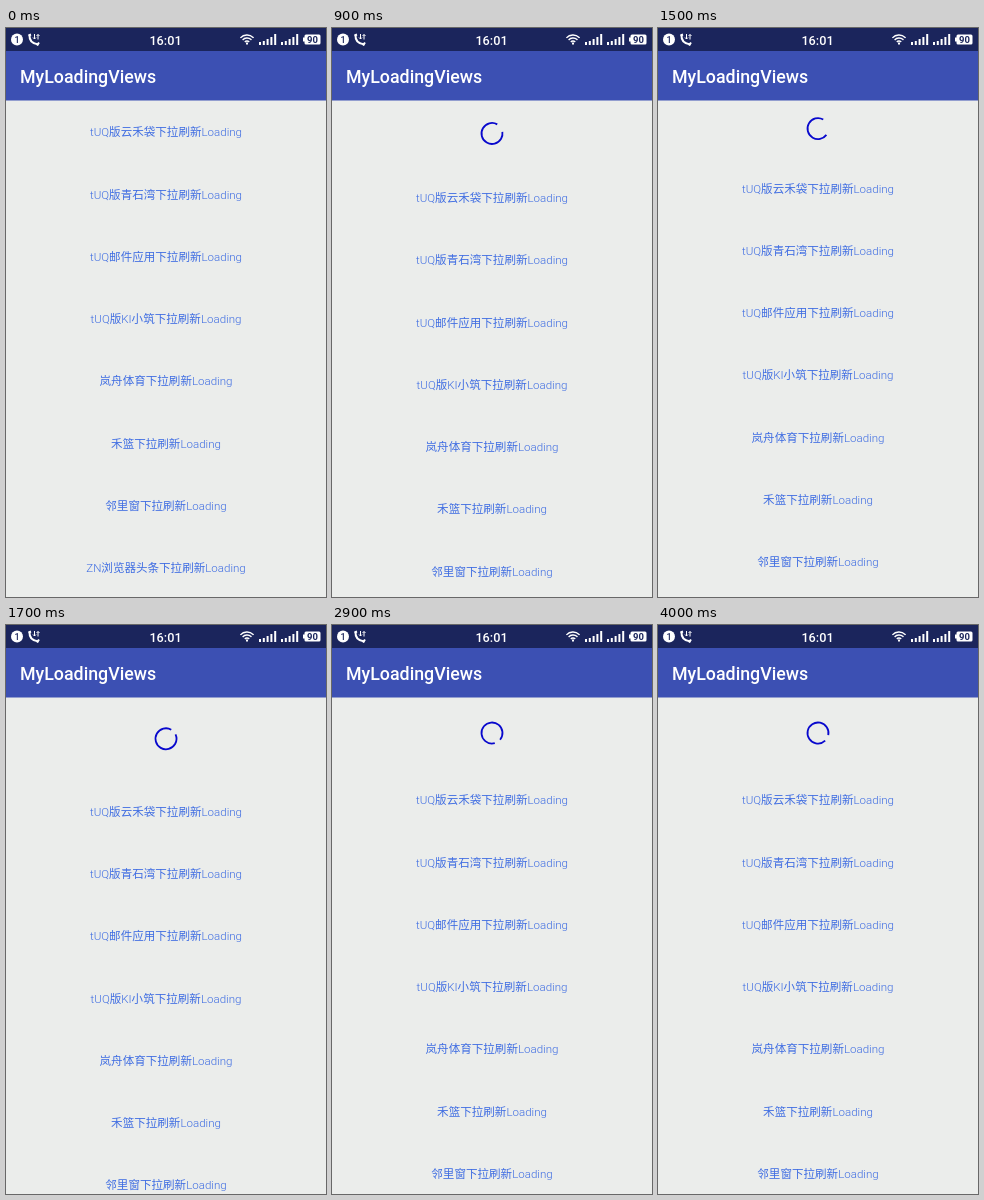
Recreate the animation shown at these times as an HTML page with a canvas. Size 320 by 569 pixels, loop 4100 ms.

```html
<!DOCTYPE html>
<html lang="zh-CN">
<head>
<meta charset="utf-8">
<style>
  html, body { margin: 0; width: 100%; height: 100%; overflow: hidden; background: #ebedeb; }
  canvas { display: block; }
</style>
</head>
<body>
<canvas id="stage" width="320" height="569"></canvas>
<script>
const ctx = document.getElementById('stage').getContext('2d');
const LOOP = 4100, STEP = 100;
const BAR_BOTTOM = 72.5, ROW_TOP = 108.3, ROW_GAP = 62.25;
const ROWS = ['tUQ版云禾袋', 'tUQ版青石湾', 'tUQ邮件应用', 'tUQ版KI小筑',
              '岚舟体育', '禾篮', '邻里窗', 'ZN浏览器头条'];
// [time, pull distance]
const PULL = [[0, 0], [885, 66], [1300, 40], [1800, 87], [1900, 87], [2400, 71], [LOOP, 71]];
const SPIN_START = 2570, SPIN_SPEED = 0.302;
const rad = deg => deg * Math.PI / 180;

function pullAt(t) {
  const i = PULL.findIndex(([time]) => time > t);
  const [t0, y0] = PULL[i - 1], [t1, y1] = PULL[i];
  return y0 + (y1 - y0) * (1 - Math.cos(Math.PI * (t - t0) / (t1 - t0))) / 2;
}

function rect(x, y, w, h, color) {
  ctx.fillStyle = color;
  ctx.fillRect(x, y, w, h);
}

function text(str, x, y, font, color, align = 'center') {
  ctx.font = font + ' Roboto, "Noto Sans CJK SC", sans-serif';
  ctx.fillStyle = color;
  ctx.textAlign = align;
  ctx.fillText(str, x, y);
}

function arc(x, y, r, from, to, width, color, ccw = false) {
  ctx.beginPath();
  ctx.arc(x, y, r, rad(from), rad(to), ccw);
  ctx.lineWidth = width;
  ctx.strokeStyle = color;
  ctx.stroke();
}

function stroke(path, width) {
  ctx.lineWidth = width;
  ctx.strokeStyle = '#fff';
  ctx.stroke(new Path2D(path));
}

function drawSignal(x) {
  [3, 4, 6, 8, 11].forEach((h, i) => rect(x + i * 3.8, 17 - h, 2, h, '#fff'));
}

function drawStatusBar() {
  const dark = '#1b255c';
  rect(0, 0, 320, 23, dark);
  ctx.fillStyle = '#fff';
  ctx.beginPath();
  ctx.arc(11, 11.5, 6, 0, rad(360));
  ctx.fill();
  text('1', 11, 14.8, '500 9px', dark);
  stroke('M23.5 7Q23 15.5 32.5 16.5', 2);
  stroke('M22.5 7.5l2.5-1M31 17.5l2-3', 2);
  stroke('M28.5 6v5M27 9.5l1.5 1.5 1.5-1.5M32 11.5v-5M30.5 8l1.5-1.5 1.5 1.5', 1);
  text('16:01', 159.5, 16.7, '500 12.7px', '#fff');
  [3, 6, 9].forEach(r => arc(241, 16, r, -137, -43, 1.4, '#fff'));
  rect(240, 14.5, 2, 2, '#fff');
  drawSignal(253);
  drawSignal(275);
  ctx.fillStyle = '#fff';
  ctx.beginPath();
  ctx.roundRect(298.5, 6.5, 16, 10, 1.5);
  ctx.fill();
  rect(297, 9.5, 2, 4, '#fff');
  text('90', 306.5, 14.8, '700 9.5px', dark);
}

function draw(t) {
  const pull = pullAt(t);
  rect(0, 0, 320, 569, '#ebedeb');
  ROWS.forEach((name, i) =>
    text(name + '下拉刷新Loading', 160, ROW_TOP + i * ROW_GAP + pull, '300 11.56px', '#3f6de2'));

  if (pull > 0) {
    const start = -60 + Math.max(0, t - SPIN_START) * SPIN_SPEED;
    const sweep = Math.min(325, pull * 4.68);
    arc(160, BAR_BOTTOM + pull / 2, 10.5, start, start - sweep, 1.8, '#0808cd', true);
  }

  rect(0, 23, 320, BAR_BOTTOM - 23, '#3c50b3');
  text('MyLoadingViews', 14, 55, '500 17.8px', '#fff', 'left');
  drawStatusBar();
}

function tick() {
  draw(Math.floor(performance.now() % LOOP / STEP) * STEP);
  requestAnimationFrame(tick);
}
tick();
</script>
</body>
</html>
```
